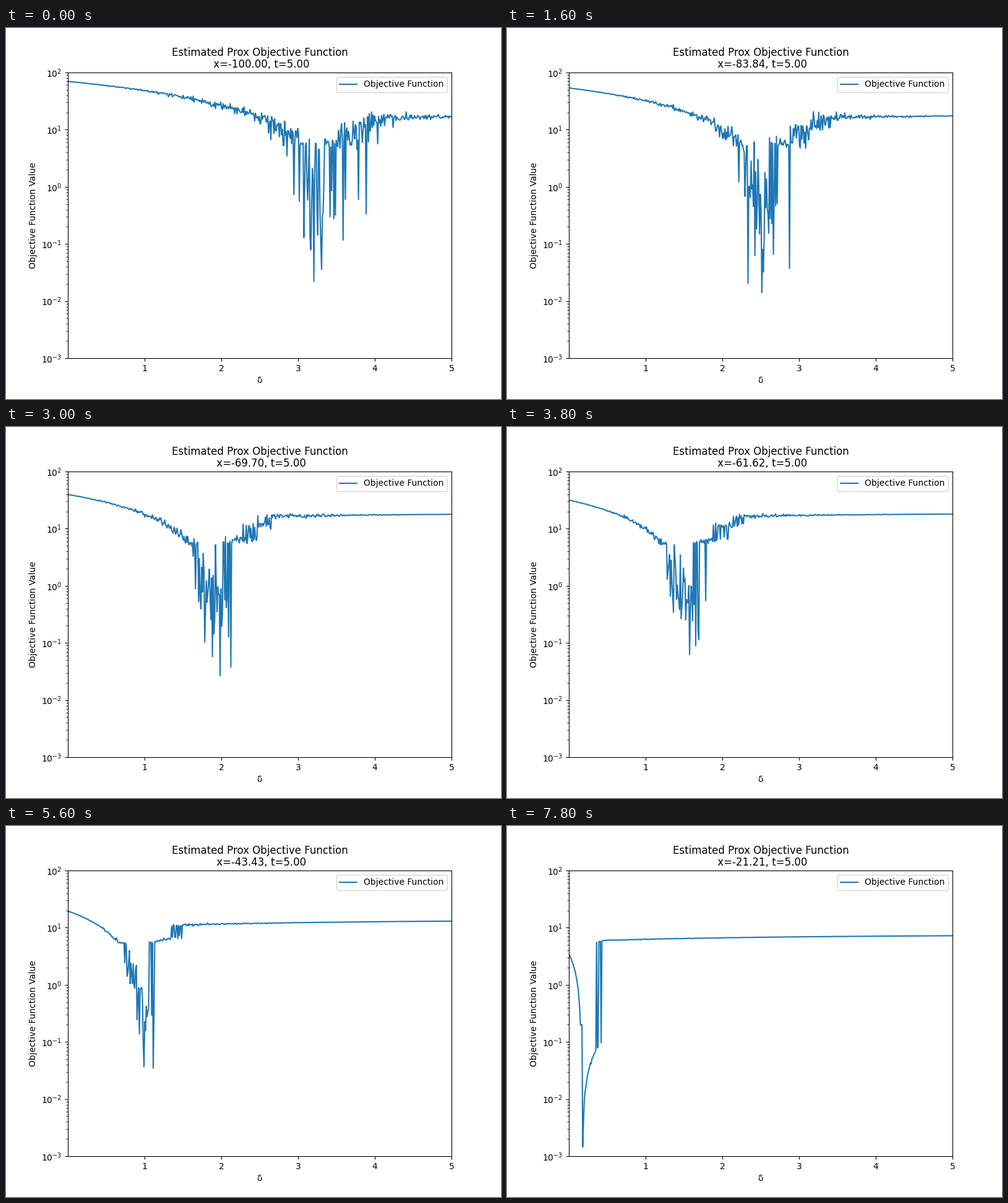
Animation, 800 px wide and 600 px high, one loop 8000 ms. Source, as a matplotlib script:

```python
import numpy as np
import matplotlib.pyplot as plt
from matplotlib.animation import FuncAnimation

plt.rcParams["font.family"] = "DejaVu Sans"

FRAMES, INTERVAL = 40, 200
T = 5.0
SLOPE = 21.7    # how fast the estimate drifts with delta
SHELF = 5.4     # flat step just before the valley
delta = np.linspace(1e-4, 5, 500)


def position(i):
    return -100 + i * 200 / 99


def plateau(gap, branch, zero):
    base = (5.8, 10.5, 15.8 - 0.25 * max(zero - 1, 0))[branch - 1]
    rise = 1.7 if branch == 1 else 3.2
    return base + rise * (1 - np.exp(-np.clip(gap, 0, None) / 2.7))


def calm_valley(off):
    left = np.maximum(-SLOPE * off, 0.2)
    return np.where(off < 0.015, left, 0.41 * np.abs(off - 0.02))


def rough_valley(off, zero, noise):
    depth = np.interp(off, [-.15, 0, .05, .19], [.5, 0, -.25, -.45])
    return 10 ** depth * (0.015 + np.abs(noise)) ** min(1, zero)


def objective(i):
    rng = np.random.default_rng(100 + i)
    drift, jitter, depth, scatter = rng.standard_normal((4, delta.size))

    # Each branch lowers the curve by one well of the objective
    x = position(i)
    branch = 1 + (x < -28) + (x < -48)
    start = -x - 11.6 - 6.15 * branch
    zero = start / SLOPE
    gap = delta - zero

    # Sampling noise grows with delta and dies out on the plateau
    settled = np.clip(gap - 0.25 * branch, 0, None)
    sigma = 0.026 * delta ** 1.5 * np.exp(-2 * settled)
    off = gap + sigma * drift
    edge = off + 0.03 * jitter
    top = plateau(gap, branch, zero)

    descent = np.maximum(-SLOPE * off, SHELF if start > SHELF else 0)
    valley = (calm_valley(off) if branch == 1
              else rough_valley(off, zero, depth))
    value = np.select(
        [off < -.15, edge < .21, edge < .49, edge < .77],
        [descent, valley, np.minimum(5.5 + 4 * (off - .19), top),
         np.minimum(11.3, top)], top)
    return value * np.exp((0.7 * sigma + 0.001) * scatter)


fig, ax = plt.subplots(figsize=(8, 6), dpi=100)
line, = ax.plot(delta, objective(0), lw=1.5, color="#1f77b4",
                label="Objective Function")
ax.set_yscale("log")
ax.set_xlim(delta[0], delta[-1])
ax.set_ylim(1e-3, 1e2)
ax.set_xlabel("δ")
ax.set_ylabel("Objective Function Value")
ax.legend(loc="upper right")
title = ax.set_title("", linespacing=1.08)


def update(i):
    line.set_ydata(objective(i))
    title.set_text("Estimated Prox Objective Function\n"
                   f" x={position(i):.2f}, t={T:.2f}")
    return line, title


anim = FuncAnimation(fig, update, frames=FRAMES, interval=INTERVAL,
                     init_func=lambda: update(0), repeat=True,
                     repeat_delay=0, blit=False)
plt.show()
```
